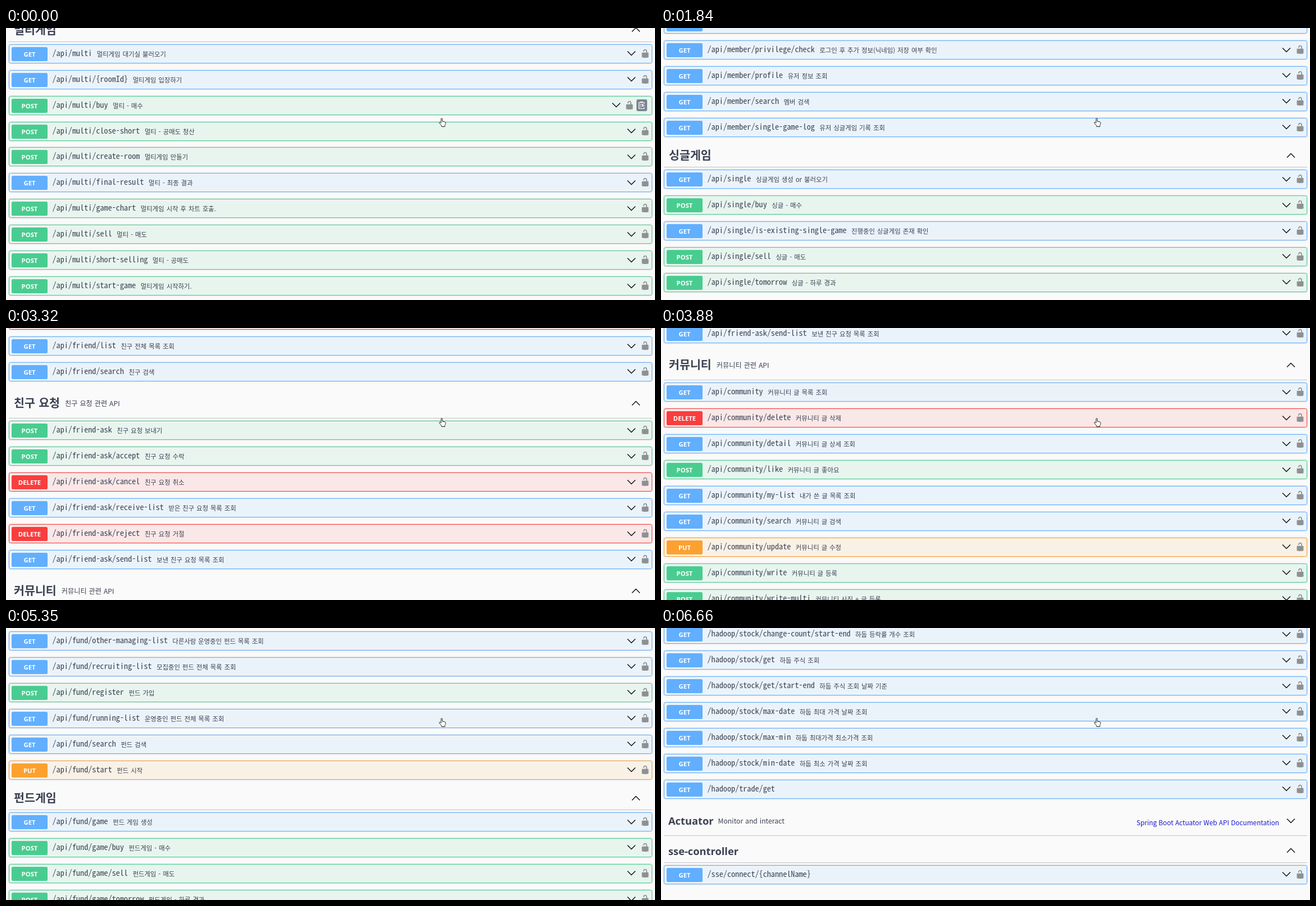
An HTML page that plays this animation: 1156x484 px, repeating every 7.12 s.

```html
<!DOCTYPE html>
<html lang="ko">
<head>
<meta charset="utf-8">
<style>
html, body { margin: 0; width: 100%; height: 100%; overflow: hidden; background: #fafafa; }
body { position: relative; color: #3b4151; font-family: "Noto Sans CJK KR", "Noto Sans CJK", "Noto Sans", sans-serif; }
#page { position: absolute; left: 0; top: 0; width: 1156px; }
.row { position: absolute; left: 5px; width: 1146px; height: 34px; box-sizing: border-box;
  border: 1px solid var(--c); border-radius: 3.5px; box-shadow: 0 0 3px rgba(0,0,0,.19);
  background: color-mix(in srgb, var(--c) 10%, #fafafa); }
.row b { position: absolute; left: 4px; top: 4px; width: 64px; height: 25px; border-radius: 2.5px;
  background: var(--c); color: #fff; text-align: center; font: 700 11.3px/25px "Open Sans", sans-serif; }
.row p { position: absolute; left: 76.5px; top: -1px; margin: 0; white-space: nowrap;
  font-size: 11.4px; line-height: 34px; word-spacing: .75px; }
.row code { position: relative; top: -1px; margin-right: 8.5px; line-height: 0; word-spacing: 0;
  font-family: "Noto Sans Mono CJK KR", "Noto Sans Mono", "Liberation Mono", monospace;
  font-size: 14.18px; font-size-adjust: ch-width .5; }
.head { position: absolute; left: 14px; height: 30px; line-height: 30px; white-space: nowrap; font-size: 12.2px; word-spacing: .5px; }
.head b { position: relative; top: 2px; font-size: 20.6px; line-height: 0; margin-right: 9px; }
.head b.latin { font: 700 18.3px/0 "Open Sans", sans-serif; margin: 0 8px 0 -1px; }
.link { position: absolute; right: 55px; font-size: 11.8px; line-height: 20px; color: #1a1ad0; white-space: nowrap; }
.line { position: absolute; left: 5px; width: 1146px; height: 1px; background: rgba(59,65,81,.3); }
svg { position: absolute; overflow: visible; fill: none; }
.arrow { stroke: #111; stroke-width: 1.45; width: 1px; height: 1px; }
.lock { width: 17px; height: 17px; fill: #8e9193; left: 1123.5px; top: 7px; }
.row .arrow { left: 1108px; top: 15.5px; }
.copy { display: none; left: 1117px; top: 5px; width: 19px; height: 21px; }
.hover .copy { display: block; }
.hover .arrow { left: 1081px; }
.hover .lock { left: 1096px; }
#hand { left: 771px; top: 160px; width: 13px; height: 16px; }
</style>
</head>
<body>
<div id="page"></div>
<svg id="hand" viewBox="0 0 13 16"><path fill="#fff" stroke="#222" stroke-linejoin="round"
  d="M4 9V1.8C4 .2 6.2.2 6.2 1.8V6l4 .9c1.4.4 1.8 1 1.8 2.2 0 2-.5 3-1.3 4.2v2.2H5V14C3.4 12.4 2.2 10.6.9 9 .1 7.8 1.5 6.9 2.5 7.8z"/></svg>
<script>
// "# title | description | link" opens a group; other lines are "method path summary".
const DOC = `
# 멀티게임
G /api/multi 멀티게임 대기실 불러오기
G /api/multi/{roomId} 멀티게임 입장하기
P /api/multi/buy 멀티 - 매수
P /api/multi/close-short 멀티 - 공매도 청산
P /api/multi/create-room 멀티게임 만들기
G /api/multi/final-result 멀티 - 최종 결과
P /api/multi/game-chart 멀티게임 시작 후 차트 호출.
P /api/multi/sell 멀티 - 매도
P /api/multi/short-selling 멀티 - 공매도
P /api/multi/start-game 멀티게임 시작하기.
# 멀티대기방
D /api/multi/exit 멀티게임 대기방 나가기
P /api/multi/invite 멀티게임 친구 초대
D /api/multi/kick 멀티게임 대기방 강퇴하기
P /api/multi/ready 멀티게임 레디
P /api/multi/room-info 멀티게임 룸 정보 소켓 전송
# 멀티복기
G /api/multi/log 멀티게임 복기
G /api/multi/round-result 멀티 - 라운드 결과
# 멤버 | 멤버 관련 API
G /api/member 내 정보 조회
U /api/member 내 정보 수정
D /api/member 회원 탈퇴
G /api/member/asset 유저 자산 조회
G /api/member/fund-log 유저 펀드 기록 조회
G /api/member/game-log 유저 게임 기록 조회
P /api/member/logout 로그아웃
G /api/member/multi-game-log 유저 멀티게임 기록 조회
U /api/member/nickname 닉네임 변경
G /api/member/nickname/check 닉네임 중복 확인
G /api/member/privilege/check 로그인 후 추가 정보(닉네임) 저장 여부 확인
G /api/member/profile 유저 정보 조회
G /api/member/search 멤버 검색
G /api/member/single-game-log 유저 싱글게임 기록 조회
# 싱글게임
G /api/single 싱글게임 생성 or 불러오기
P /api/single/buy 싱글 - 매수
G /api/single/is-existing-single-game 진행중인 싱글게임 존재 확인
P /api/single/sell 싱글 - 매도
P /api/single/tomorrow 싱글 - 하루 경과
# 알림
G /api/notice 알림 목록 조회
D /api/notice/delete 알림 삭제
D /api/notice/delete-all 알림 전체 삭제
U /api/notice/read 알림 읽음 처리
G /api/notice/unread 안 읽은 알림 조회
# 주식
G /api/stock 주식 목록 조회
G /api/stock/chart 주식 차트 조회
G /api/stock/detail 주식 상세 조회
G /api/stock/price 주식 가격 조회
G /api/stock/rank 주식 순위 조회
G /api/stock/search 주식 검색
G /api/stock/trade 주식 거래 조회
# 친구 | 친구 관련 API
D /api/friend/delete 친구 삭제
G /api/friend/list 친구 전체 목록 조회
G /api/friend/search 친구 검색
# 친구 요청 | 친구 요청 관련 API
P /api/friend-ask 친구 요청 보내기
P /api/friend-ask/accept 친구 요청 수락
D /api/friend-ask/cancel 친구 요청 취소
G /api/friend-ask/receive-list 받은 친구 요청 목록 조회
D /api/friend-ask/reject 친구 요청 거절
G /api/friend-ask/send-list 보낸 친구 요청 목록 조회
# 커뮤니티 | 커뮤니티 관련 API
G /api/community 커뮤니티 글 목록 조회
D /api/community/delete 커뮤니티 글 삭제
G /api/community/detail 커뮤니티 글 상세 조회
P /api/community/like 커뮤니티 글 좋아요
G /api/community/my-list 내가 쓴 글 목록 조회
G /api/community/search 커뮤니티 글 검색
U /api/community/update 커뮤니티 글 수정
P /api/community/write 커뮤니티 글 등록
P /api/community/write-multi 커뮤니티 사진 + 글 등록
# 퀴즈 | 퀴즈 관련 API
G /api/quiz 퀴즈 랜덤 5개 조회
U /api/quiz/update 퀴즈 3/5 맞추고 500만원 이하이면 100만원 부여
# 펀드
U /api/fund/close 펀드 종료
G /api/fund/fund-detail 펀드 상세 조회
G /api/fund/fundname/check 펀드 이름 중복 체크
G /api/fund/investing-closed-list 내가 가입한 펀드 중 종료된 펀드 목록 조회
G /api/fund/investing-list 내가 가입한 펀드 목록 조회
P /api/fund/make 펀드 만들기
G /api/fund/managing-closed-list 내가 운영한 펀드 중 종료된 펀드 목록 조회
G /api/fund/managing-list 내가 운영중인 펀드 목록 조회
G /api/fund/other-managing-list 다른사람 운영중인 펀드 목록 조회
G /api/fund/recruiting-list 모집중인 펀드 전체 목록 조회
P /api/fund/register 펀드 가입
G /api/fund/running-list 운영중인 펀드 전체 목록 조회
G /api/fund/search 펀드 검색
U /api/fund/start 펀드 시작
# 펀드게임
G /api/fund/game 펀드 게임 생성
P /api/fund/game/buy 펀드게임 - 매수
P /api/fund/game/sell 펀드게임 - 매도
P /api/fund/game/tomorrow 펀드게임 - 하루 경과
# 하둡
G /hadoop/rank/get 하둡 순위 조회
G /hadoop/stock/average 하둡 평균 가격 조회
G /hadoop/stock/average/start-end 하둡 평균 가격 날짜 기준
G /hadoop/stock/change 하둡 등락률 조회
G /hadoop/stock/change/max 하둡 최대 등락률 조회
G /hadoop/stock/change/min 하둡 최소 등락률 조회
G /hadoop/stock/change/start-end 하둡 등락률 날짜 기준
G /hadoop/stock/change-count 하둡 등락률 개수
G /hadoop/stock/change-count/start-end 하둡 등락률 개수 조회
G /hadoop/stock/get 하둡 주식 조회
G /hadoop/stock/get/start-end 하둡 주식 조회 날짜 기준
G /hadoop/stock/max-date 하둡 최대 가격 날짜 조회
G /hadoop/stock/max-min 하둡 최대가격 최소가격 조회
G /hadoop/stock/min-date 하둡 최소 가격 날짜 조회
G /hadoop/trade/get
# Actuator | Monitor and interact | Spring Boot Actuator Web API Documentation
# sse-controller
G /sse/connect/{channelName}`;

const METHODS = {
  G: ['GET', '#61affe'], P: ['POST', '#49cc90'],
  D: ['DELETE', '#f93e3e'], U: ['PUT', '#fca130'],
};
const LOCK = `<svg class="lock" viewBox="0 0 20 20"><path d="M15.8 8H14V5.6C14 2.7 12.7 1 10 1S6 2.7 6 5.6V6h2v-.8C8 3.8 8.8 3 10 3s2 .8 2 2.2V8H4C3.4 8 3 8.6 3 9.2V17c0 .5.4 1.1 1 1.3 2 .7 10 .7 12 0 .6-.2 1-.8 1-1.3V9.2C17 8.6 16.4 8 15.8 8z"/></svg>`;
const COPY = `<svg class="copy" viewBox="0 0 19 21"><rect width="19" height="21" rx="3" fill="#7d8492"/><path stroke="#fff" stroke-width="1.2" d="M13.5 8V5.5h-9v11h9V14M7 5.5v-1h4v1M6.5 8.5h5M6.5 11h2M6.5 13.5h2M15 11H10m2-2-2 2 2 2"/></svg>`;
const PITCH = 45.93;

const arrow = (up, style = '') => {
  const d = up ? 3.5 : -3.5;
  return `<svg class="arrow" style="${style}"><path d="M-7 ${d}L0 ${-d}L7 ${d}"/></svg>`;
};

const page = document.getElementById('page');
const rowY = {};
let y = -PITCH;  // centre of the latest row
let html = '';

function addGroup(text, isEmpty) {
  const [title, note = '', link] = text.split(' | ');
  const next = y + (note ? 104.4 : 92.4);
  const mid = next - (note ? 48 : 42);
  const latin = /^[a-z]/i.test(title) ? ' class="latin"' : '';
  html += `<div class="head" style="top:${mid - 15}px"><b${latin}>${title}</b>${note}</div>`
    + arrow(!isEmpty, `left:1122px;top:${mid - .5}px`)
    + `<div class="line" style="top:${next - 22}px"></div>`;
  if (link) html += `<div class="link" style="top:${mid - 7}px">${link}</div>`;
  y = next - (isEmpty ? 45 : PITCH);
}

function addRow(text) {
  const [, key, path, note] = text.match(/^(\w) (\S+) ?(.*)$/);
  const [name, color] = METHODS[key];
  y += PITCH;
  rowY[path] = y;
  html += `<div class="row" data-path="${path}" style="top:${y - 17}px;--c:${color}"><b>${name}</b>`
    + `<p><code>${path}</code>${note}</p>${arrow(false)}${LOCK}${path === '/api/multi/buy' ? COPY : ''}</div>`;
}

const lines = DOC.trim().split('\n');
lines.forEach((line, i) => {
  if (line[0] === '#') addGroup(line.slice(2), (lines[i + 1] || '')[0] === '#');
  else addRow(line);
});
page.innerHTML = html;
const hovered = page.querySelector('[data-path="/api/multi/buy"]');

// Scroll updates: first time, last time, number of steps.
const BURSTS = [
  [650, 1350, 11], [1420, 2120, 11], [2190, 2890, 11], [2960, 3670, 11],
  [3740, 4440, 11], [4510, 5200, 11], [5270, 5950, 10], [6030, 6660, 10],
];
// Step at which a row's centre reaches a given height on the stage.
const KEYS = [
  [0, '/api/multi', 45.75], [5, '/api/multi/exit', 17],
  [18, '/api/member/privilege/check', 39], [39, '/api/friend/list', 32],
  [56, '/api/community/write-multi', 29.2], [68, '/api/fund/other-managing-list', 23],
  [86, '/hadoop/stock/change-count/start-end', 11.2],
].map(([step, path, at]) => [step, rowY[path] - at]);

const stepAt = t => BURSTS.reduce((sum, [a, b, n]) =>
  sum + Math.max(0, Math.min(n, Math.floor((t - a) / (b - a) * (n - 1) + .01) + 1)), 0);

function scrollAt(step) {
  const i = Math.max(1, KEYS.findIndex(k => k[0] >= step));
  const [s0, y0] = KEYS[i - 1], [s1, y1] = KEYS[i];
  return y0 + (y1 - y0) * (step - s0) / (s1 - s0);
}

function draw() {
  const step = stepAt(performance.now() % 7120);
  page.style.top = `${-scrollAt(step)}px`;
  hovered.classList.toggle('hover', step === 0);
  requestAnimationFrame(draw);
}
draw();
</script>
</body>
</html>
```
